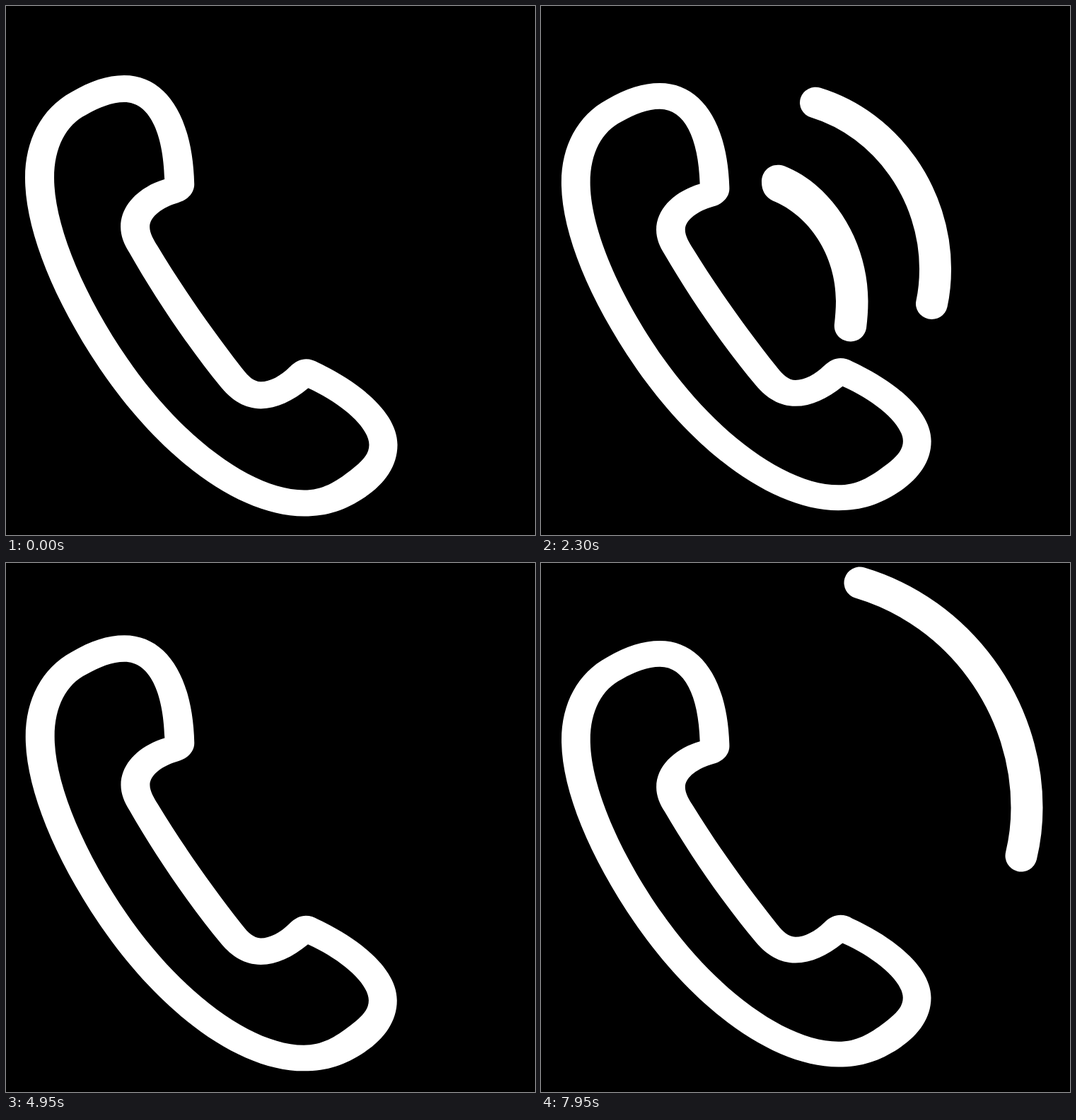
Animation of 748x748 px, one loop 8000 ms. Source, as an HTML page:

```html
<!DOCTYPE html>
<html lang="en">
<head>
<meta charset="utf-8">
<title>Ringing phone</title>
<style>
  html, body { margin: 0; width: 100%; height: 100%; overflow: hidden; background: #000; }
  svg { display: block; width: 100%; height: 100%; }
</style>
</head>
<body>
<svg viewBox="0 0 748 748">
  <path id="phone" fill="#fff" fill-rule="evenodd" d="
    M27 243C27 190 50 145 92 122C119 106 143 98 167 98C228 98 264 160 266 252
    C266 264 257 274 243 278C222 284 203 297 203 312C203 321 209 331 214 339
    C250 399 293 460 335 514C342 523 350 531 360 531C373 531 388 523 401 510
    C408 503 416 499 424 499C430 499 436 501 441 504C500 532 553 575 553 620
    C553 650 535 675 507 694C480 712 455 721 421 721C330 721 220 640 135 516
    C66 414 27 315 27 243Z
    M68 243C68 200 85 168 113 154C132 143 150 136 167 136C202 136 222 178 224 245
    C190 255 162 280 162 312C162 325 167 337 174 348C208 408 257 482 304 539
    C319 557 337 569 360 569C383 569 405 558 427 540C475 562 513 596 513 620
    C513 633 504 643 487 656C465 673 447 684 421 684C350 684 250 612 172 499
    C108 406 68 308 68 243Z"/>
  <path id="near" fill="#fff" d="
    M344 226C412 253 462.5 334 462.5 420C462.5 434 461.5 446 460 459
    C458 470 449 478 438 478C423 478 413 466 415 452C416 442 417 431 417 420
    C417 354 379 297 328 276C318 271 312 262 312 249C312 233 325 220 344 226Z"/>
  <g fill="none" stroke="#fff" stroke-width="45" stroke-linecap="round">
    <path id="mid" d="M388.5 134C490 166 557.5 268 557.5 375C557.5 392 556 409 552.5 425.5"/>
    <path id="far" d="M451 28C592 70 687 203 687 346C687 370 684 393 679 414"/>
  </g>
</svg>
<script>
  const LOOP = 8000, CYCLE = 6650, START = 200, END = 6450, STEP = 50;
  const WAVE = 1725;

  const [phone, near, mid, far] =
    ["phone", "near", "mid", "far"].map(id => document.getElementById(id));

  const linear = x => x;
  const sine = x => (1 - Math.cos(Math.PI * x)) / 2;

  // Value at time t along [time, value] keys.
  function along(keys, t, ease = linear) {
    if (t <= keys[0][0]) return keys[0][1];
    for (let i = 1; i < keys.length; i++) {
      const [t0, a] = keys[i - 1], [t1, b] = keys[i];
      if (t < t1) return a + (b - a) * ease((t - t0) / (t1 - t0));
    }
    return keys[keys.length - 1][1];
  }

  // Stretches an element so that its rest box [left, top, right, bottom] fills another.
  function fit(el, rest, box) {
    const sx = (box[2] - box[0]) / (rest[2] - rest[0]);
    const sy = (box[3] - box[1]) / (rest[3] - rest[1]);
    el.setAttribute("transform",
      `matrix(${sx} 0 0 ${sy} ${box[0] - rest[0] * sx} ${box[1] - rest[1] * sy})`);
  }

  const show = (el, on) => el.setAttribute("visibility", on ? "visible" : "hidden");

  const squash = [[0, 0], [430, 1], [740, 0], [1100, 1], [1210, 1], [1750, 0], [2180, 1],
    [2625, 0], [3150, 1], [3620, 0], [4100, 1], [4560, 0], [5030, 1], [5500, 0], [5880, 1], [6250, 0]];
  const growth = [[250, 0], [325, 0.15], [650, 1]];
  const farTop = [[500, 12], [650, 10], [800, 0], [850, 4], [1025, 5]];
  const farRight = [[800, 705.8], [850, 708], [900, 709.5]];

  function draw(time) {
    const t = Math.floor((time % LOOP) / STEP) * STEP % CYCLE;
    const u = t >= END ? 0 : Math.max(0, t - START);
    const p = u % WAVE;

    const s = along(squash, u, sine);
    fit(phone, [27, 98, 553, 721], [27 + 2 * s, 98 + 12 * s, 553.5 - 2 * s, 721.5 - 9 * s]);

    const g = along(growth, p);
    fit(near, [312, 224, 462.5, 478], [312, 224.5 - g / 2, 462.5, 473 + 5 * g]);
    fit(mid, [366, 111.5, 580, 448], [366, 116 - 4.5 * g, 580, 441 + 7 * g]);

    const top = along(farTop, p), right = along(farRight, p);
    fit(far, [428.5, 5.5, 709.5, 436.5], [1138 - right, top + 0.5, right, 441.5 - top]);

    show(near, p >= 50 && p < 800);
    show(mid, p >= 200 && p < 975);
    show(far, p >= 475 && p < 1200);
  }

  const origin = performance.now();
  function tick() {
    draw(performance.now() - origin);
    requestAnimationFrame(tick);
  }
  tick();
</script>
</body>
</html>
```
